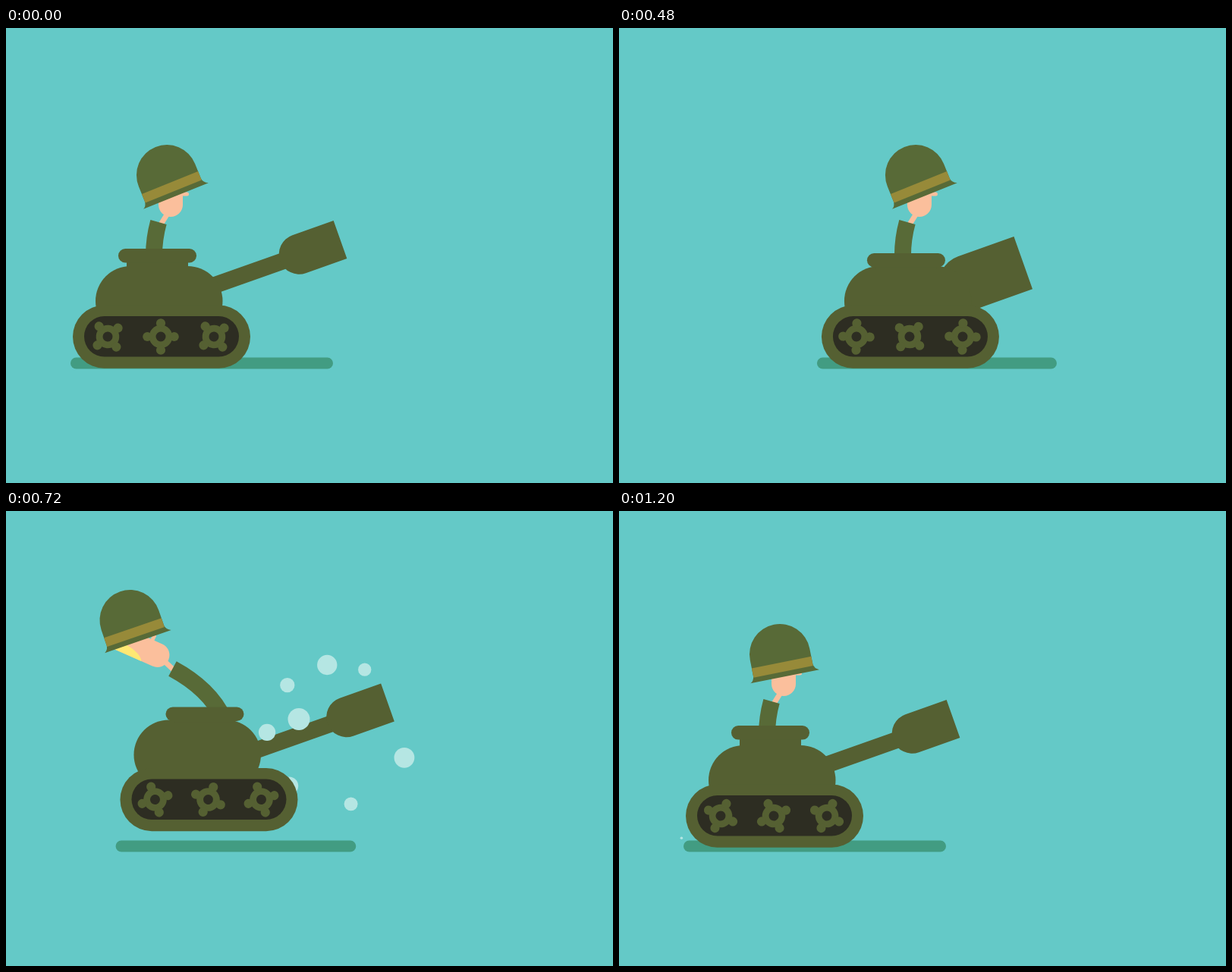
Animation, 800 px wide and 600 px high, one loop 1240 ms. Source, as an HTML page with a canvas:

```html
<!DOCTYPE html>
<html lang="en">
<head>
<meta charset="utf-8">
<title>Tank</title>
<style>
html, body { margin: 0; width: 100%; height: 100%; overflow: hidden; background: #64c9c7; }
canvas { display: block; width: 800px; height: 600px; }
</style>
</head>
<body>
<canvas id="stage" width="800" height="600"></canvas>
<script>
const ctx = document.getElementById('stage').getContext('2d');
const LOOP = 1240, STEP = 40, FIRE = 520, HIT = 560, FLASH_END = 600, LAND = 960;
const OLIVE = '#556032', HELMET = '#586a37', BAND = '#978a39', SKIN = '#fbbf9c',
  DARK = '#2d2d22', GLOW = '#ffcc00', SMOKE = '#733e20', PUFF = '#b5e6e3';
const RAD = Math.PI / 180, TILT = -19.5 * RAD;

// Easing: smooth rise, rise and fall, and a hop from a to b
function ramp(t, a, b) {
  const p = Math.min(1, Math.max(0, (t - a) / (b - a)));
  return p * p * (3 - 2 * p);
}
const pulse = (t, a, b, c, d) => ramp(t, a, b) * (1 - ramp(t, c, d));
const hop = (t, a, b) => Math.max(0, 4 * (t - a) * (b - t) / (b - a) ** 2);
// Share of the recoil still to come
const recoil = t => (Math.max(0, LAND - t) / (LAND - FIRE)) ** 2;

// Soldier poses, relative to the tank
const REST = { helmet: [212, 194, -22], head: [217, 233, 0], base: [195, 300], bend: [195, 278], tip: [201, 256] };
const JOLT = { helmet: [211.5, 188, -23], head: [222, 247, 0], base: [158, 322], bend: [160, 292], tip: [186, 266] };
const BACK = { helmet: [101, 170.5, -19], head: [137, 216.5, -66], base: [224, 300], bend: [206, 261], tip: [157, 234.5] };
const FLOP = { helmet: [296, 256.5, 77.5], head: [236, 245.5, 104], base: [187, 292], bend: [183, 268], tip: [193.5, 247.5] };
const ACTS = [[0, REST], [FIRE, REST], [HIT, JOLT], [720, BACK], [920, FLOP], [1080, REST], [LOOP, REST]];

function pose(t) {
  const i = ACTS.findIndex(([end]) => end > t);
  const [start, from] = ACTS[i - 1], [end, to] = ACTS[i];
  const e = ramp(t, start, end), mixed = {};
  for (const part in from) mixed[part] = from[part].map((v, k) => v + (to[part][k] - v) * e);
  return mixed;
}

function at(x, y, angle, draw) {
  ctx.save();
  ctx.translate(x, y);
  ctx.rotate(angle);
  draw();
  ctx.restore();
}
function fill(color, path) {
  ctx.fillStyle = color;
  ctx.beginPath();
  path();
  ctx.fill();
}
const circle = (x, y, r, color) => fill(color, () => ctx.arc(x, y, Math.max(0, r), 0, 7));
const box = (x, y, w, h, r, color) => fill(color, () => ctx.roundRect(x, y, w, h, r));
const shape = (d, color) => { ctx.fillStyle = color; ctx.fill(new Path2D(d)); };
function stroke(d, width, color) {
  ctx.strokeStyle = color;
  ctx.lineWidth = width;
  ctx.stroke(new Path2D(d));
}
// In the flash a part glows to the right of x = edge
function lit(flash, edge, part, draw) {
  if (flash) {
    part(GLOW);
    ctx.beginPath();
    ctx.rect(-100, -100, 100 + edge, 200);
    ctx.clip();
  }
  draw();
}

function soldier(t, flash) {
  const { helmet, head, base, bend, tip } = pose(t);
  const skin = flash ? '#d6633b' : SKIN;
  const [x, y] = head, a = head[2] * RAD, c = Math.cos(a), s = Math.sin(a);
  stroke(`M${tip[0] + 3} ${tip[1] + 3}L${x - 3 * c - 10 * s} ${y - 3 * s + 10 * c}`, 7, skin);
  const arm = `M${base}Q${bend} ${tip}`;
  stroke(arm, 22, flash ? GLOW : HELMET);
  if (flash) at(-2, -1, 0, () => stroke(arm, 18, HELMET));

  at(x, y, a, () => {
    const face = color => box(-16, -58, 32, 74, [0, 0, 16, 16], color);
    box(12, -16.5, 12, 5, 2.5, SKIN);
    lit(flash, 9, face, () => face(skin));
    if (!flash) shape('M-16 -16Q-4 -22 -3 -58H-16Z', '#ffe873');
  });

  const wobble = 12 * hop(t, 1120, LOOP);
  at(helmet[0], helmet[1], (helmet[2] + wobble) * RAD, () => {
    const shell = color => shape('M-40 0A40 40 0 0 1 40 0V21Q40.500 27 47 30H-45.500Q-41 28 -40 22Z', color);
    lit(flash, 26, shell, () => {
      shell(HELMET);
      ctx.fillStyle = BAND;
      ctx.fillRect(-40, 10.8, 80, 12.5);
    });
  });
}

function gun(t) {
  const pull = pulse(t, 330, 480, FLASH_END, 720);
  const end = -92 * pull, width = 53 + 20.5 * pull, length = 84 + 31 * pull;
  at(440.5, 279, TILT, () => {
    stroke(`M-200 1.500H${end - length + 10}`, 22, OLIVE);
    box(end - length, -width / 2, length, width, [width / 2, 0, 0, width / 2], OLIVE);
  });
}

function turret(t) {
  const x = -12 * pulse(t, HIT, 720, 720, 900), y = -12 * pulse(t, HIT, 720, 800, 1050);
  // The hatch settles across the loop point
  const lift = -12 * (t < HIT ? 1 - ramp(t + LOOP, 1120, 1360) : pulse(t, HIT, 720, 1120, 1360));
  box(118 + x, 314 + y, 167.5, 92, 46, OLIVE);
  ctx.fillRect(159, 306 + lift, 81, Math.max(0, 12 + y - lift));
  box(148, 297 + lift, 103, 18.5, 9.25, OLIVE);
}

function litTurret() {
  shape('M210 316H231Q234 312 241 308L278 297L290 366H210Z', GLOW);
  shape('M242 326L282 312L300 368L267 364Q240 352 242 326Z', OLIVE);
  box(75, 324, 158, 92, 46, OLIVE);
  shape('M147 322Q147 317 152 317H215Q232 333 233 363.500H298V370H147Z', OLIVE);
}

function tracks(t) {
  box(88, 365.5, 234, 83.2, 41.6, OLIVE);
  box(103, 380, 204, 53.5, 26.7, DARK);
  const turn = t < FIRE ? 45 * t / FIRE : 160 * recoil(t) - 115;
  for (let i = 0; i < 3; i++)
    at(134 + 70 * i, 407, (turn + (i % 2 ? 0 : 50)) * RAD, () => {
      circle(0, 0, 15.3, OLIVE);
      for (let k = 0; k < 4; k++) {
        ctx.rotate(Math.PI / 2);
        circle(0, -17.7, 6.1, OLIVE);
      }
      circle(0, 0, 6.5, DARK);
    });
}

// Smoke lobes around a core, each lit on its outer side
function blast(t) {
  const size = ramp(t, 480, HIT);
  ctx.save();
  ctx.translate(465 + 75 * size, 339 - 31 * size);
  ctx.scale(size, size);
  circle(-43, 23, 41, SMOKE);
  for (const [x, y] of [[19, -48], [-51, -25], [20, 39], [52, -7]]) {
    circle(x * 1.1, y + 11 * Math.sign(y), 41, GLOW);
    circle(x, y, 41, SMOKE);
  }
  circle(-5, 1, 46, SMOKE);
  ctx.fillRect(-85, -8, 60, 50);
  ctx.restore();
}

function trail(y, width, color) {
  const length = 110 + width;
  at(800, y, -20.7 * RAD, () => {
    const fade = ctx.createLinearGradient(-length, 0, -10, 0);
    fade.addColorStop(0, `rgba(${color},0)`);
    fade.addColorStop(1, `rgb(${color})`);
    ctx.fillStyle = fade;
    ctx.fillRect(-length, -width / 2, length + 20, width);
  });
}

// A shrinking ring of puffs around the muzzle
function puffs(t) {
  const q = (t - 580) / 140;
  if (q < 0) return;
  const spread = 0.3 + 0.7 * Math.sqrt(q), size = 1.8 - 0.8 * q;
  const puff = (angle, distance, r) => circle(437 + Math.cos(angle * RAD) * distance * spread,
    295 + Math.sin(angle * RAD) * distance * spread, r * size, PUFF);
  for (let i = 0; i < 7; i++) puff(19 + 63 * i - 2.9 * i * i, 93, 11 + 2.4 * Math.cos(2.6 * i));
  puff(202, 55, 14.5);
}

function dust(t) {
  if (t < LAND) return;
  const left = 1 - (t - LAND) / 300;
  circle(80 + 12 * left, 430 + 6 * left, 9 * left, PUFF);
}

function render(t) {
  const flash = t >= FIRE && t < FLASH_END;
  const x = 210 * (t < FIRE ? (t / FIRE) ** 2 : recoil(t));
  const y = -27.6 * hop(t, HIT, LAND) - 10.2 * hop(t, LAND, LOOP);
  const squeeze = pulse(t, 330, 480, 700, 920);
  ctx.fillStyle = flash ? '#ff9a00' : '#64c9c7';
  ctx.fillRect(0, 0, 800, 600);
  if (flash && t > FIRE) {
    trail(189.5, 25, '255,80,0');
    trail(216, 24, '255,163,10');
    trail(235.5, 12, '255,80,0');
  }
  box(85 + x - 3 * squeeze, 434.5, 346 - 30 * squeeze, 15, 7.5, flash ? '#b94f42' : '#429c82');
  dust(t);
  if (flash) blast(t);
  at(x, y, 0, () => {
    soldier(t, flash);
    if (flash) litTurret();
    else {
      gun(t);
      turret(t);
    }
  });
  if (!flash) puffs(t);
  at(x, y, 0, () => tracks(t));
}

function tick() {
  render(Math.floor(performance.now() % LOOP / STEP) * STEP);
  requestAnimationFrame(tick);
}
tick();
</script>
</body>
</html>
```
